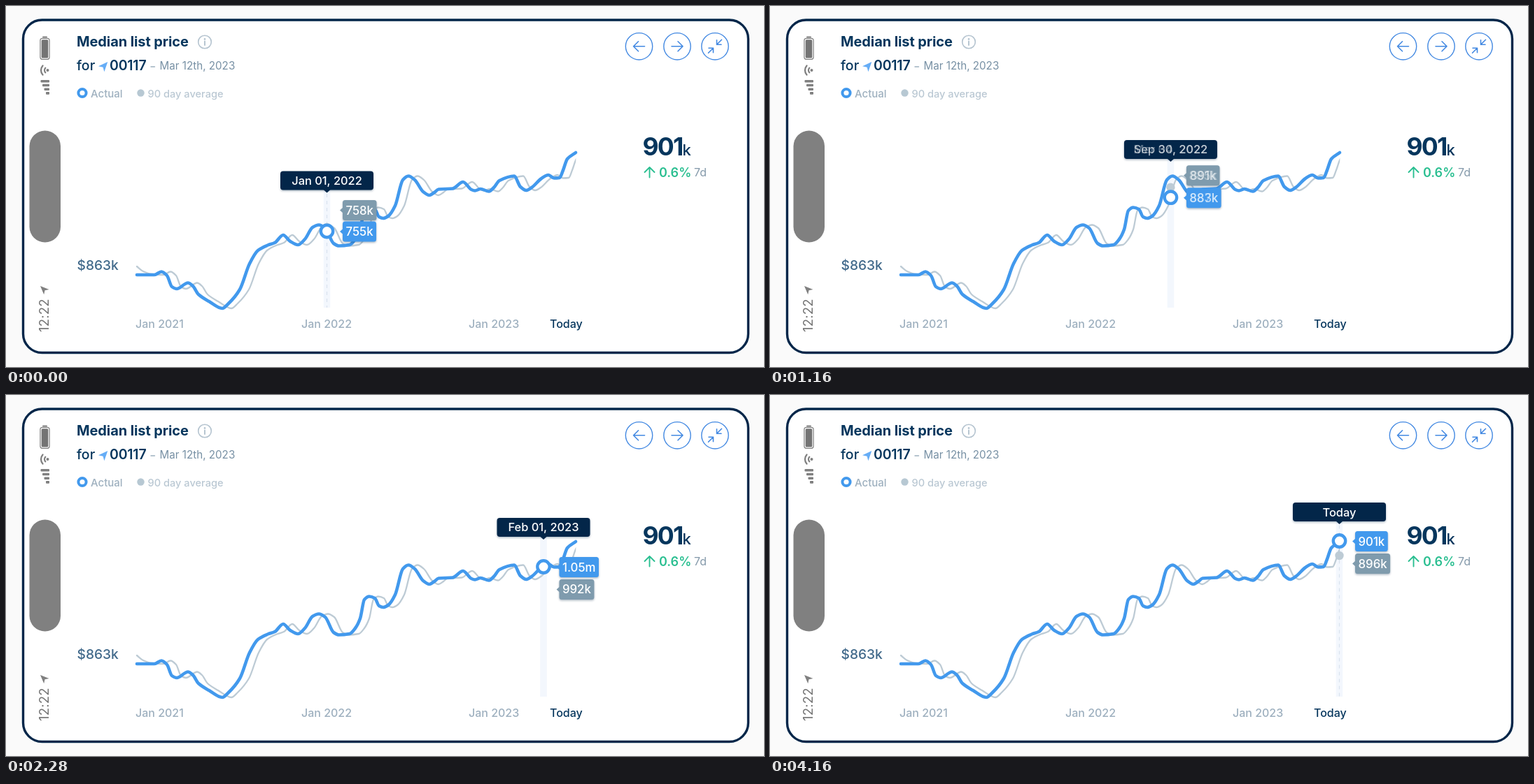
An HTML page with a canvas for the animation above (5.05 s loop, 1083 px wide and 517 px high).

```html
<!DOCTYPE html>
<html lang="en">
<head>
<meta charset="utf-8">
<title>Median list price</title>
<style>
html, body { margin: 0; width: 100%; height: 100%; overflow: hidden; background: #fafafa; }
canvas { display: block; width: 1083px; height: 517px; }
</style>
</head>
<body>
<canvas id="stage"></canvas>
<script>
const W = 1083, H = 517, LOOP = 5050;
const NAVY = '#032649', INK = '#06365d', BLUE = '#4299ed', LINE = '#bdcbd5', SLATE = '#7f9bad', GREY = '#808080';
const canvas = document.getElementById('stage');
const ctx = canvas.getContext('2d');
const dpr = window.devicePixelRatio || 1;
canvas.width = W * dpr;
canvas.height = H * dpr;

const price = [
  187,385, 212,385, 222,380.5, 230,386, 237,402, 244,405, 260,396.5, 267,401, 275,413, 290,423,
  309,433, 318,426, 334,406, 348,369, 360,350, 374,342.5, 384,339, 396,328, 406,337, 417,342,
  427,334, 438,317, 447,313.5, 456,318, 468,340, 476,343.5, 491,342, 499,334, 506,320, 512,293,
  519,288.5, 527,291, 533,302, 539,304, 546,301, 556,286, 567,249, 575,243.5, 584,249, 596,266,
  605,271, 612,267, 618,262.5, 638,261.5, 653,252, 665,263, 670,264.5, 678,262, 690,265.5, 697,260,
  705,250, 726,243.5, 735,259, 743,264, 751,260, 765,247, 775,242, 783,246.5, 791,246, 796,235,
  802,219, 814,210
];
const pairs = list => Array.from({ length: list.length / 2 }, (_, i) => [list[2 * i], list[2 * i + 1]]);
const actual = pairs(price);
// The average trails the price by 13px.
const average = [[187, 373], [196, 380], [208, 384], ...actual.slice(1).map(([x, y]) => [x + 13, y])];

// Smooth curve that never overshoots its points.
function smooth(pts) {
  const slope = i => (pts[i + 1][1] - pts[i][1]) / (pts[i + 1][0] - pts[i][0]);
  const last = pts.length - 1;
  const tangent = i => {
    if (i === 0) return slope(0);
    if (i === last) return slope(last - 1);
    const a = slope(i - 1), b = slope(i);
    return a * b <= 0 ? 0 : 2 * a * b / (a + b);
  };
  const path = new Path2D();
  path.moveTo(...pts[0]);
  for (let i = 0; i < last; i++) {
    const [x0, y0] = pts[i], [x1, y1] = pts[i + 1], d = (x1 - x0) / 3;
    path.bezierCurveTo(x0 + d, y0 + d * tangent(i), x1 - d, y1 - d * tangent(i + 1), x1, y1);
  }
  return path;
}
const actualPath = smooth(actual), averagePath = smooth(average);

const stop = (x, blue, grey, tip, side, date, now, avg) => ({ x, blue, grey, tip, side, date, now, avg });
const stops = [
  stop(458.5, 322.5, 317, 250, -30.5, 'Jan 01, 2022', '755k', '758k'),
  stop(538.5, 303.5, 290, 227.5, -32, 'Mar 04, 2022', '887k', '885k'),
  stop(590, 259, 244, 194, -32, 'Sep 30, 2022', '883k', '891k'),
  stop(646, 255, 262, 195, 32, 'Nov 14, 2022', '887k', '884k'),
  stop(743.5, 260.5, 241, 186, -32.5, 'Jan 15, 2023', '887k', '894k'),
  stop(768, 246, 247, 189.5, 32, 'Feb 01, 2023', '1.05m', '992k'),
  stop(813.5, 209, 230, 167.5, 32, 'Today', '901k', '896k')
];
const starts = [600, 1100, 1415, 1730, 2045, 2360];
const ease = p => 1 - (1 - p) ** 5;

function pose(t) {
  const k = starts.filter(s => t >= s).length;
  if (!k) return { a: stops[0], b: stops[0], p: 1, still: true };
  const span = k === 1 ? 300 : 315;
  const raw = Math.min(1, (t - starts[k - 1]) / span);
  return { a: stops[k - 1], b: stops[k], p: ease(raw), still: raw === 1 };
}

function text(str, x, y, size, weight, color, spacing = 0, align = 'left') {
  ctx.font = `${weight} ${size}px Inter, Lato, sans-serif`;
  ctx.letterSpacing = spacing + 'px';
  ctx.textAlign = align;
  ctx.fillStyle = color;
  ctx.fillText(str, x, y);
}

function poly(pts, color) {
  ctx.beginPath();
  pairs(pts).forEach(([x, y]) => ctx.lineTo(x, y));
  ctx.closePath();
  ctx.fillStyle = color;
  ctx.fill();
}

function stroke(color, width, ...lines) {
  ctx.strokeStyle = color;
  ctx.lineWidth = width;
  ctx.beginPath();
  for (const l of lines) pairs(l).forEach(([x, y], i) => i ? ctx.lineTo(x, y) : ctx.moveTo(x, y));
  ctx.stroke();
}

function box(x, y, w, h, r, fill) {
  ctx.beginPath();
  ctx.roundRect(x, y, w, h, r);
  if (fill) { ctx.fillStyle = fill; ctx.fill(); }
}

function disc(x, y, r, fill, line, width) {
  ctx.beginPath();
  ctx.arc(x, y, r, 0, 7);
  if (fill) { ctx.fillStyle = fill; ctx.fill(); }
  if (line) { ctx.strokeStyle = line; ctx.lineWidth = width; ctx.stroke(); }
}

function shadow(on) {
  ctx.shadowColor = on ? 'rgba(3,38,73,.32)' : 'transparent';
  ctx.shadowBlur = on ? 3 * dpr : 0;
  ctx.shadowOffsetY = on ? 1.5 * dpr : 0;
}

function drawPhone() {
  ctx.fillStyle = '#fafafa';
  ctx.fillRect(0, 0, W, H);
  box(24.5, 20, 1036, 476.5, 27, '#fff');
  ctx.strokeStyle = NAVY;
  ctx.lineWidth = 3.4;
  ctx.stroke();

  box(52, 43.5, 7, 2, 1, GREY);
  box(48.9, 46.3, 13.2, 30, 3);
  ctx.strokeStyle = GREY;
  ctx.lineWidth = 1.2;
  ctx.stroke();
  box(50.7, 48.2, 9.6, 26.2, 1.5, '#747474');

  for (const r of [5, 10]) {
    ctx.beginPath();
    ctx.arc(60, 92, r, Math.PI * .77, Math.PI * 1.23);
    ctx.strokeStyle = GREY;
    ctx.lineWidth = 2.3;
    ctx.stroke();
  }
  disc(59.5, 92, 2, GREY);
  [12.5, 10, 7.5, 5].forEach((w, i) => box(62 - w, 106 + i * 5.7, w, 3.6, 1, GREY));
  box(33.5, 178.5, 44.5, 160, 22.2, GREY);
  poly([49, 401, 61.5, 406, 55.5, 407.3, 54.2, 413.2], GREY);

  ctx.save();
  ctx.translate(61, 467);
  ctx.rotate(-Math.PI / 2);
  text('12:22', 0, 0, 18.5, 400, '#747474', .2);
  ctx.restore();
}

function drawHeader() {
  text('Median list price', 101, 57.8, 20, 700, INK, -.1);
  disc(284, 51.5, 9.3, null, '#b4c3cf', 1.6);
  disc(284, 47.4, 1.3, '#b4c3cf');
  stroke('#b4c3cf', 1.9, [284, 50.5, 284, 56]);

  text('for', 101, 92, 19.5, 500, INK);
  poly([145.3, 80, 132, 86.2, 138.6, 87.8, 140.4, 94.2], '#66adf6');
  text('00117', 148, 92, 19.5, 600, INK, -.2);
  stroke('#9db0bf', 1.4, [207, 87, 212.5, 87]);
  text('Mar 12th, 2023', 219.5, 91, 15.2, 400, '#7790a4');

  disc(109, 124.5, 5.6, '#fff', BLUE, 4);
  text('Actual', 121, 130.5, 15, 500, '#9eb0bf');
  disc(192.5, 124.5, 5.2, '#b7c8d3');
  text('90 day average', 202.5, 130.5, 14.6, 500, '#bac8d3');

  const link = '#4389e2';
  for (const x of [904.5, 959, 1013]) disc(x, 57.8, 19.2, null, link, 1.4);
  for (const [x, s] of [[904.5, -1], [959, 1]])
    stroke(link, 1.6, [x - 8 * s, 57.8, x + 8 * s, 57.8], [x + s, 50.8, x + 8 * s, 57.8, x + s, 64.8]);
  for (const s of [1, -1]) {
    const at = (...v) => v.map((n, i) => (i % 2 ? 57.8 - n * s : 1013 + n * s));
    stroke(link, 1.6, at(9.5, 9.5, 2.5, 2.5), at(2.5, 9, 2.5, 2.5, 9, 2.5));
  }
}

function drawStats() {
  text('$863k', 101.5, 378, 19.2, 500, '#426a8b');
  text('901', 909.5, 213.5, 35.5, 700, INK, -1.7);
  text('k', 966.5, 213.5, 22, 500, INK);
  stroke('#2bbf91', 1.9, [919.5, 245.5, 919.5, 231], [912.5, 238, 919.5, 231, 926.5, 238]);
  text('0.6%', 933, 244.5, 18, 600, '#2bbf91');
  text('7d', 983, 243.5, 16, 400, '#8499aa');

  text('Jan 2021', 185, 460.5, 16, 500, '#9eb0bf');
  text('Jan 2022', 422, 460.5, 16, 500, '#9eb0bf');
  text('Jan 2023', 661, 460.5, 16, 500, '#9eb0bf');
  text('Today', 777, 460.5, 16, 500, INK);
}

function drawCurves() {
  ctx.save();
  ctx.beginPath();
  ctx.rect(180, 150, 634.3, 300);
  ctx.clip();
  ctx.strokeStyle = LINE;
  ctx.lineWidth = 2.3;
  ctx.stroke(averagePath);
  ctx.restore();
  ctx.strokeStyle = BLUE;
  ctx.lineWidth = 4.6;
  ctx.stroke(actualPath);
}

// Fades from one label to the next.
function swap(from, to, p, x, y, size, spacing = 0) {
  if (from !== to) {
    ctx.globalAlpha = 1 - p;
    text(from, x, y, size, 500, '#fff', spacing, 'center');
    ctx.globalAlpha = p;
  }
  text(to, x, y, size, 500, '#fff', spacing, 'center');
  ctx.globalAlpha = 1;
}

function tag(x, y, from, to, p, color) {
  const size = 16.8;
  ctx.font = `500 ${size}px Inter, Lato, sans-serif`;
  ctx.letterSpacing = '0px';
  const wide = s => ctx.measureText(s).width + 9;
  const w = wide(from) + (wide(to) - wide(from)) * p;
  shadow(true);
  box(x, y - 14.5, w, 29, 3.5, color);
  shadow(false);
  poly([x + .5, y - 4, x - 4, y, x + .5, y + 4], color);
  swap(from, to, p, x + w / 2, y + 6, size);
}

function draw(t) {
  ctx.setTransform(dpr, 0, 0, dpr, 0, 0);
  ctx.lineCap = ctx.lineJoin = 'round';
  const { a, b, p, still } = pose(t);
  const mix = key => a[key] + (b[key] - a[key]) * p;
  const x = mix('x'), blue = mix('blue'), grey = mix('grey'), tip = mix('tip');

  drawPhone();
  drawHeader();
  drawStats();

  ctx.fillStyle = '#f3f7fd';
  ctx.fillRect(x - 4.8, tip + 13, 9.6, 432 - tip - 13);
  if (still) {
    ctx.setLineDash([5, 5]);
    ctx.lineCap = 'butt';
    stroke('#d9e3ee', 1.2, [x, tip + 19, x, 432]);
    ctx.setLineDash([]);
    ctx.lineCap = 'round';
  }

  drawCurves();
  disc(x, grey, 6.2, LINE);
  disc(x, blue, 8.7, '#fff', BLUE, 4.4);

  tag(x + 22.5, blue + .5 + mix('side'), a.avg, b.avg, p, SLATE);
  tag(x + 22.5, blue + .5, a.now, b.now, p, BLUE);

  shadow(true);
  box(x - 66.5, tip - 13.5, 133, 27, 4, NAVY);
  shadow(false);
  poly([x - 5, tip + 13, x, tip + 17.5, x + 5, tip + 13], NAVY);
  swap(a.date, b.date, p, x, tip + 6, 16.4);
}

function tick() {
  draw((performance.now() - begin) % LOOP);
  requestAnimationFrame(tick);
}
const begin = performance.now();
tick();
</script>
</body>
</html>
```
